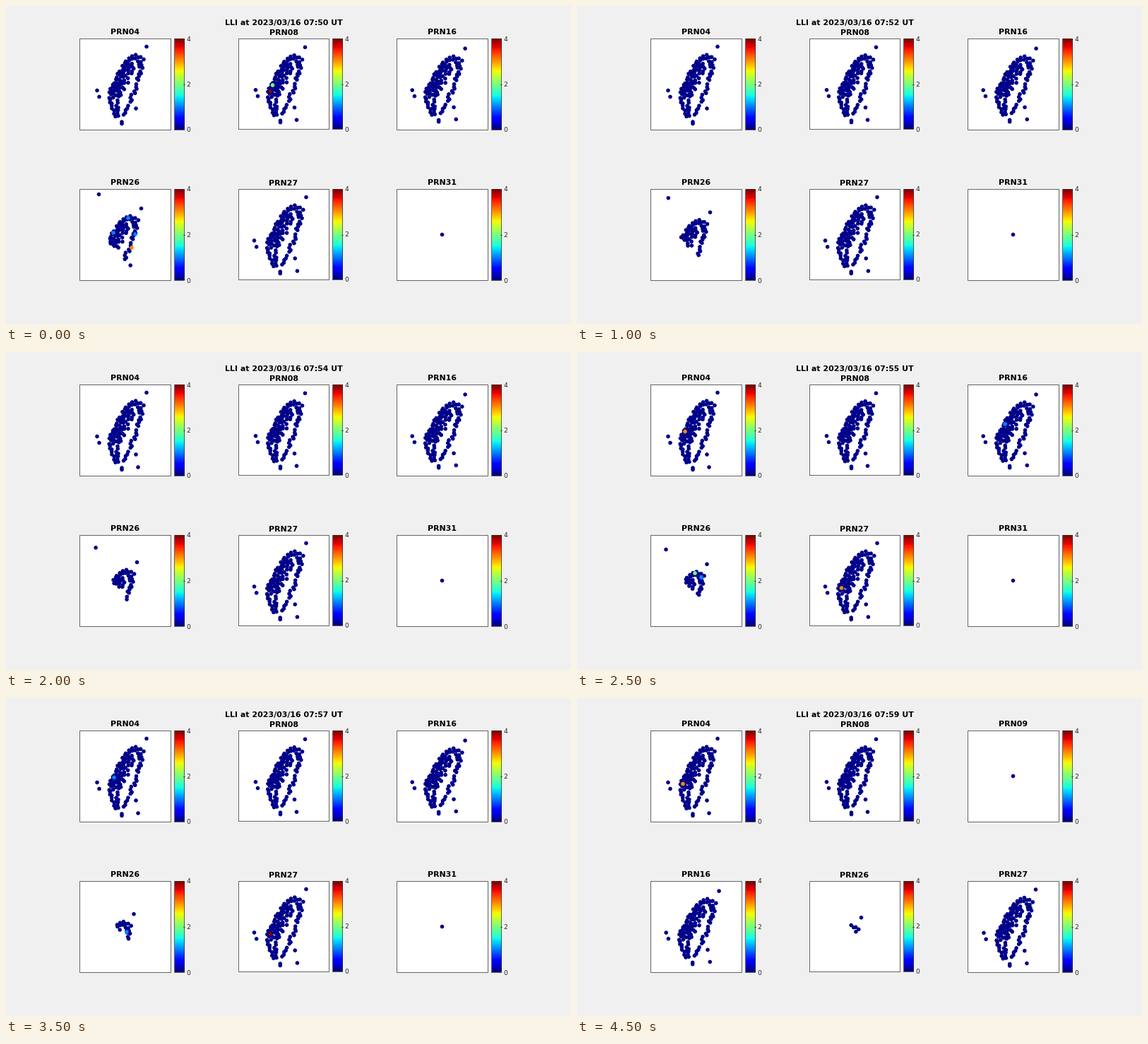
A matplotlib script for the animation above (5000 ms loop, 800 by 450 pixels).

```python
import numpy as np
import matplotlib.pyplot as plt
from matplotlib.animation import FuncAnimation
from matplotlib.patches import Rectangle

W, H, PX = 800, 450, 0.72
INK = "#262626"
NAVY = (0, 0, 0.54, 1)
JET = plt.get_cmap("jet", 64)

# Coast and inner edges of the two populated strips, at heights EDGE_Y
EDGE_Y = [-43, -33, -23, -9, 7, 21, 35, 48]
WEST_OUT = [12, -1, -6, -16, -22, -24, -19, -13]
WEST_IN = [20, 11, 12, 8, 0, -11, -9, -8]
EAST_IN = [15, 17, 19, 15, 11, 6, 1, -5]
EAST_OUT = [22, 23, 25, 21, 16, 11, 3, -4]
NORTH = (30, -53.5)
LONE = [NORTH, (26, -35.5), (15, 34), (-40, 8.5), (-37, 17.5),
        (-5, 53), (-5, 55.5), (18, 52)]


def scatter_stations(count, gap, seed):
    """Random stations inside the two strips, none closer than gap."""
    rng = np.random.default_rng(seed)
    pts = np.empty((0, 2))
    while len(pts) < count:
        x, y = rng.uniform((-26, -43), (26, 48))
        a, b, c, d = (np.interp(y, EDGE_Y, e)
                      for e in (WEST_OUT, WEST_IN, EAST_IN, EAST_OUT))
        inside = a <= x <= b or c <= x <= d
        if inside and np.all(np.hypot(*(pts - (x, y)).T) > gap):
            pts = np.vstack([pts, (x, y)])
    return pts


NET = np.vstack([scatter_stations(112, 2.7, 7), LONE])

# How far each satellite's view stretches the network
STRETCH = {"04": (1, 1), "08": (1, 0.975), "16": (1.07, 0.95),
           "27": (1.05, 0.99)}


def setting(k):
    """Low satellite: the view drifts while the south-west drops out."""
    keep = NET[:, 1] - 1.25 * NET[:, 0] < 17.5 - 8.2 * k
    north = (22.5 - 1.5 * k, -37.5 + 2.75 * k)
    pts = (NET[keep] - NORTH) * (1.02 - 0.01 * k, 0.92) + north
    if k < 6:
        pts = np.vstack([pts, (-37.5 - 1.1 * k, -57.5 + 2.6 * k)])
    return pts


def stations(prn, k):
    if prn in ("09", "31"):
        return np.array([(-0.5, -0.5)])
    if prn == "26":
        return setting(k)
    pts = NET * STRETCH[prn]
    return pts[:-1] if prn == "04" and k < 4 else pts


def satellites(k):
    return "04 08 16 26 27 31".split() if k < 8 else "04 08 09 16 26 27".split()


# Sites that raise the indicator, and the minutes when they do
HUB, SHORE, NORTHWEST, EAST = (-19, 10.5), (-16, 1.5), (-12, -9), (13.5, 3)
FLAGS = {
    0: [("08", SHORE, 2), ("08", HUB, 4), ("26", (4, -24), 1),
        ("26", (-17, -3), 1), ("26", (14, -1), 1), ("26", (9, 18), 3)],
    1: [("08", HUB, 1), ("26", (4.5, 18), 1), ("26", (8, 19), 3)],
    3: [("04", NORTHWEST, 2), ("16", HUB, 1), ("26", (1, -17), 4),
        ("27", EAST, 1)],
    5: [("04", SHORE, 3), ("16", NORTHWEST, 1), ("26", (-2, -11), 2),
        ("26", (7, -5), 1), ("27", HUB, 3)],
    7: [("04", SHORE, 1), ("26", (2, 7), 1), ("27", HUB, 4)],
    8: [("04", HUB, 2), ("08", (-17.5, 23.5), 2), ("08", EAST, 2),
        ("16", EAST, 1)],
    9: [("04", HUB, 3)],
}

fig = plt.figure(figsize=(8, 4.5), dpi=100, facecolor="#f0f0f0")
ax = fig.add_axes([0, 0, 1, 1])
ax.axis("off")


def box(x, y, w, h, fill, z):
    ax.add_patch(Rectangle((x, y), w, h, fc=fill, ec=INK, lw=0.5,
                           snap=False, zorder=z))


def heading(x, y):
    return ax.text(x, y, "", size=11 * PX, weight="bold", color="black",
                   ha="center", va="baseline", family="DejaVu Sans")


def panel(left, top, size):
    """Axes box with its colour bar; returns the centre and the title."""
    box(left, top, size, size, "white", 1)
    bar, mid, base = left + size + 5, top + size / 2, top + size
    ax.imshow(np.arange(64)[::-1, None], cmap=JET, aspect="auto",
              interpolation="nearest", zorder=1,
              extent=(bar, bar + 14, base, top))
    box(bar, top, 14, size, "none", 2)
    ax.plot([bar + 12.5, bar + 14], [mid, mid], color=INK, lw=0.5)
    for v in (0, 2, 4):
        ax.text(bar + 17, base - 0.5 - v * size / 4, str(v), size=9.2 * PX,
                color=INK, va="center_baseline", family="DejaVu Sans")
    center = (left + size / 2, mid)
    return center, heading(center[0] - 0.5, top - 6.5 + (129 - size))


panels = [panel(left, top, size) for top in (46.5, 259.5)
          for left, size in ((104.5, 129), (329.5, 128), (553.5, 129))]
clock = heading(393.5, 27)
dots = ax.scatter([], [], s=(5.6 * PX) ** 2, linewidths=0, zorder=3)
ax.set_xlim(0, W)
ax.set_ylim(H, 0)


def draw(k):
    clock.set_text(f"LLI at 2023/03/16 07:{50 + k} UT")
    prns = satellites(k)
    pts, cols = [], []
    for prn, (center, title) in zip(prns, panels):
        title.set_text("PRN" + prn)
        p = stations(prn, k) + center
        pts.extend(p)
        cols.extend([NAVY] * len(p))
    for prn, site, value in FLAGS.get(k, []):
        pts.append(np.add(site, panels[prns.index(prn)][0]))
        cols.append(JET(value / 4))
    dots.set_offsets(np.array(pts))
    dots.set_facecolors(cols)
    return [dots, clock]


anim = FuncAnimation(fig, draw, frames=10, interval=500, repeat=True,
                     repeat_delay=0, blit=False)
plt.show()
```
